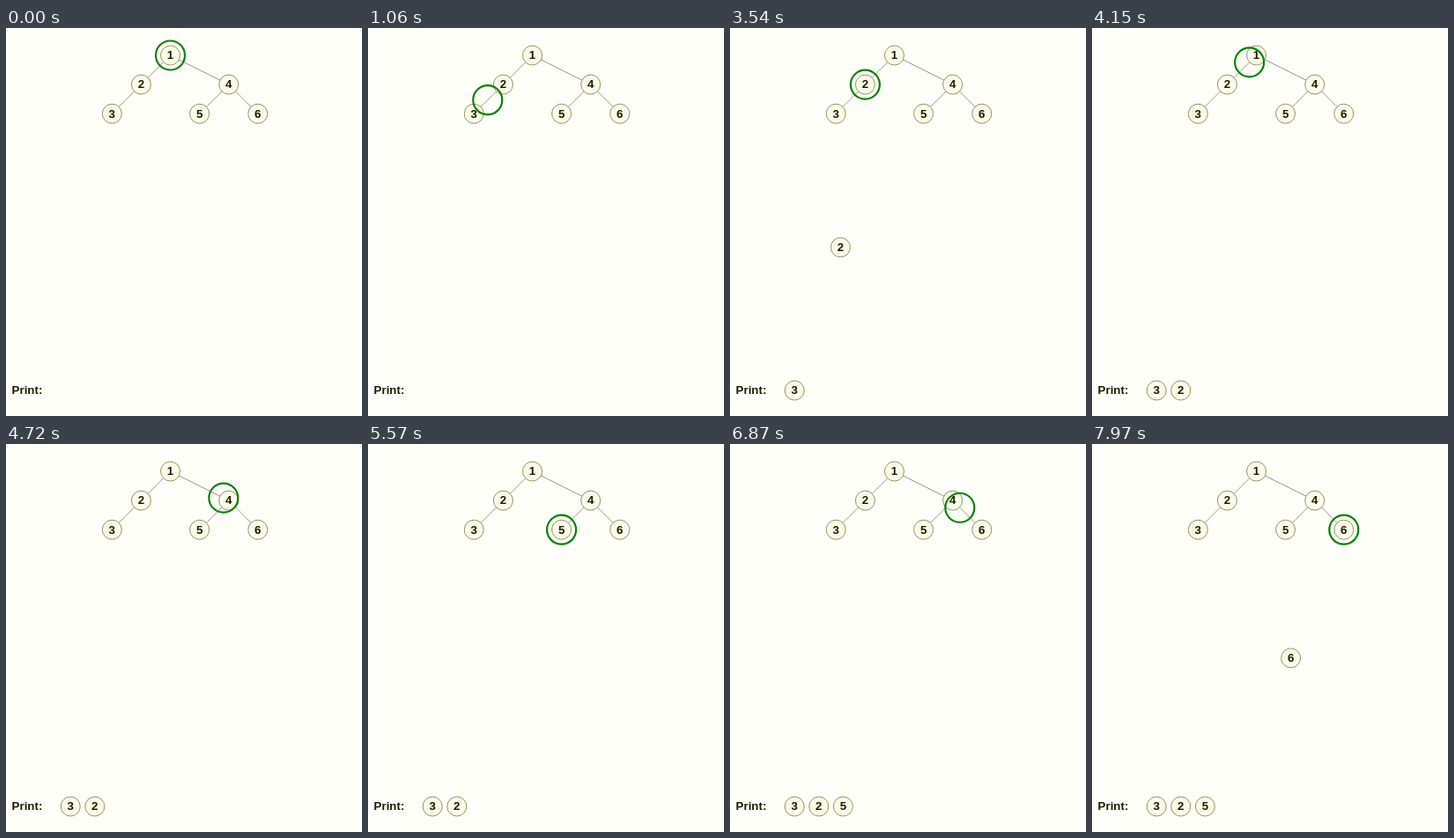
These frames come from a looping animation (404 px wide and 440 px high, 8000 ms). An HTML page:

```html
<!DOCTYPE html>
<html lang="en">
<head>
<meta charset="utf-8">
<title>Tree traversal</title>
<style>
  html, body { margin: 0; width: 100%; height: 100%; overflow: hidden; background: #fffffa; }
  svg { display: block; width: 404px; height: 440px; }
  text { font: bold 13.3px "Liberation Sans", Arial, sans-serif; fill: #1c1c08; }
  .node circle { fill: #fbfce8; stroke: #8f9660; }
  .node text { text-anchor: middle; }
  .edge { stroke: #98998a; }
  .ring { fill: none; stroke: #0c8204; stroke-width: 2.2; }
</style>
</head>
<body>
<svg viewBox="0 0 404 440">
  <g id="edges"></g>
  <g id="tree"></g>
  <text x="6.6" y="415">Print:</text>
  <circle id="ring" class="ring" r="16.5"/>
  <g id="copies"></g>
</svg>
<script>
const LOOP = 8000, START = 301, UNIT = 496;
const GRID = 33.1, SLOT = 27.6;

// Column shifts are relative to the parent
const root = {
  key: 1, shift: 0, kids: [
    { key: 2, shift: -1, kids: [{ key: 3, shift: -1, kids: [] }] },
    { key: 4, shift: 2, kids: [
      { key: 5, shift: -1, kids: [] },
      { key: 6, shift: 1, kids: [] }
    ] }
  ]
};

const $ = id => document.getElementById(id);

function add(parent, tag, attrs, text) {
  const el = document.createElementNS("http://www.w3.org/2000/svg", tag);
  for (const name in attrs) el.setAttribute(name, attrs[name]);
  if (text) el.textContent = text;
  return parent.appendChild(el);
}

function place(el, [x, y]) {
  el.setAttribute("transform", `translate(${x.toFixed(2)} ${y.toFixed(2)})`);
}

function addNode(parent, { key, at }) {
  const g = add(parent, "g", { class: "node" });
  add(g, "circle", { r: 11 });
  add(g, "text", { y: 4.3 }, key);
  place(g, at);
  return g;
}

function layOut(node, x, y) {
  node.at = [x, y];
  addNode($("tree"), node);
  for (const kid of node.kids) {
    layOut(kid, x + kid.shift * GRID, y + GRID);
    add($("edges"), "line", { class: "edge", x1: x, y1: y, x2: kid.at[0], y2: kid.at[1] });
  }
}

// Post-order walk: each move, pause and print lasts one unit
const moves = [], prints = [];
let unit = 0;

function walk(node) {
  for (const kid of node.kids) {
    moves.push({ unit: unit++, from: node.at, to: kid.at });
    walk(kid);
    moves.push({ unit: unit++, from: kid.at, to: node.at });
  }
  unit++;
  const to = [73.2 + SLOT * prints.length, 411];
  prints.push({ unit: unit++, from: node.at, to, el: addNode($("copies"), node) });
}

layOut(root, 186.5, 31);
walk(root);

const mix = (a, b, k) => a.map((v, i) => v + (b[i] - v) * k);

function draw(t) {
  const progress = step => Math.max(0, Math.min(1, (t - START) / UNIT - step.unit));
  let spot = root.at;
  for (const move of moves) {
    const k = progress(move);
    if (k > 0) spot = mix(move.from, move.to, k);
  }
  place($("ring"), spot);
  for (const print of prints) {
    const k = progress(print);
    print.el.style.display = k > 0 ? "" : "none";
    place(print.el, mix(print.from, print.to, k));
  }
}

const origin = performance.now();
function tick() {
  draw((performance.now() - origin) % LOOP);
  requestAnimationFrame(tick);
}
tick();
</script>
</body>
</html>
```
